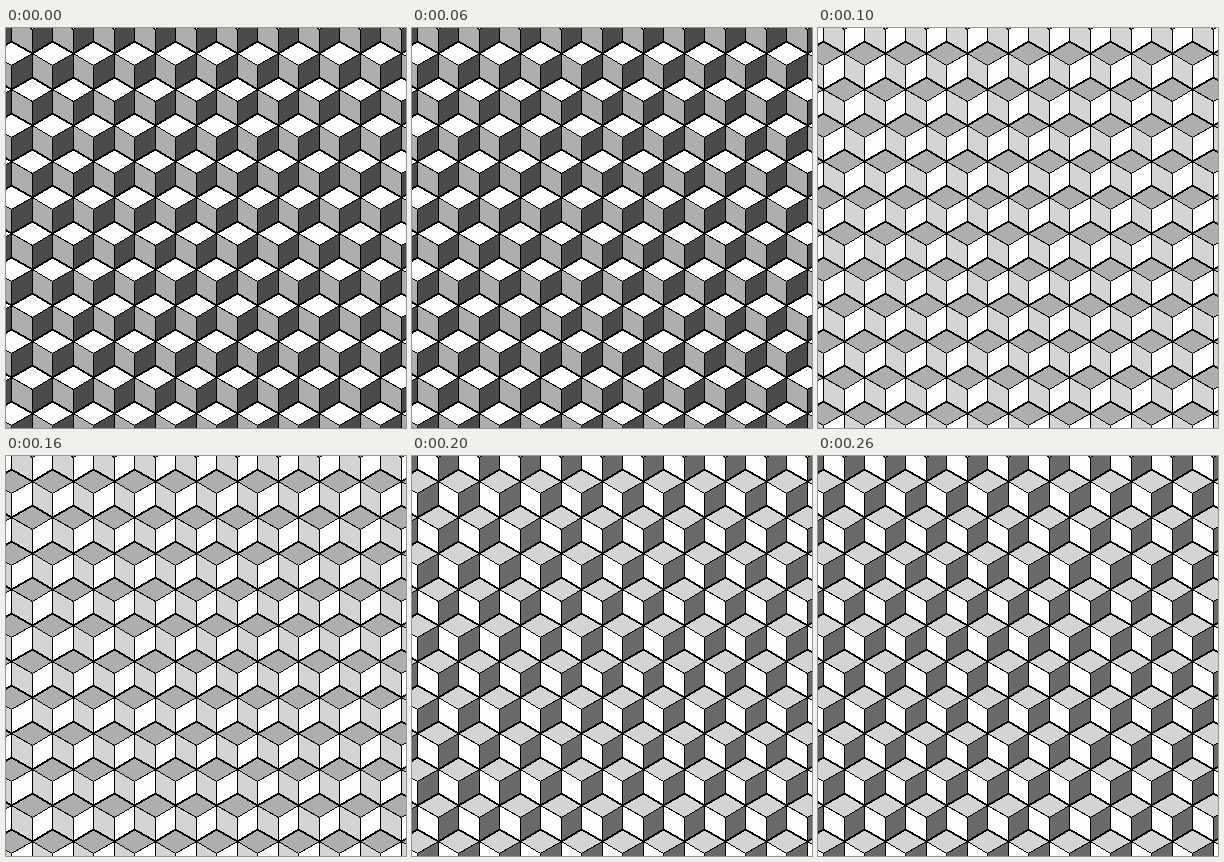
An HTML page for the animation above (0.3 s loop, 400 px wide and 400 px high).

```html
<!DOCTYPE html>
<html>
<head>
<meta charset="utf-8">
<title>Cubes</title>
<style>
html, body { margin: 0; width: 100%; height: 100%; overflow: hidden; background: #fff; }
svg { display: block; shape-rendering: crispEdges; }
path { stroke: #000; stroke-width: 1; }
.edge { fill: none; stroke-width: 1.8; }
.top { fill: var(--top); }
.left { fill: var(--left); }
.right { fill: var(--right); }
</style>
</head>
<body>
<svg id="stage" width="400" height="400" viewBox="0 0 400 400"></svg>
<script>
const stage = document.getElementById('stage');
const STEP_MS = 100;
const PITCH = 41, HALF = PITCH / 2, RISE = 12, ROW = 36;
const SHADES = [
  { top: '#fdfdfd', left: '#aeaeae', right: '#4b4b4b' },
  { top: '#aeaeae', left: '#d4d4d4', right: '#fdfdfd' },
  { top: '#d4d4d4', left: '#fdfdfd', right: '#6a6a6a' }
];

// Puts vertices on pixel centres so that upright lines stay one pixel wide
const snap = v => Math.floor(v) + 0.5;

function path(name, points, end = 'Z') {
  return `<path class="${name}" d="M${points.join('L')}${end}"/>`;
}

function cube(x, y) {
  const at = (side, level) => [snap(x + side * HALF), snap(y + level * RISE)];
  const peak = at(0, 0), mid = at(0, 2), foot = at(0, 4);
  const lt = at(-1, 1), lb = at(-1, 3), rt = at(1, 1), rb = at(1, 3);
  return path('left', [lt, mid, foot, lb]) +
    path('right', [rt, mid, foot, rb]) +
    path('top', [peak, rt, mid, lt]) +
    path('edge', [lt, peak, rt], '') +
    path('edge', [lb, foot, rb], '');
}

let cubes = '';
for (let row = -1; row < 11; row++) {
  const start = 46.5 - (row % 2 ? HALF : 0);
  for (let col = -2; col < 10; col++) {
    cubes += cube(start + col * PITCH, 13 + row * ROW);
  }
}
stage.innerHTML = cubes;

let shown = -1;
function tick() {
  const step = Math.floor(performance.now() / STEP_MS) % SHADES.length;
  if (step !== shown) {
    shown = step;
    for (const [face, color] of Object.entries(SHADES[step])) {
      stage.style.setProperty('--' + face, color);
    }
  }
  requestAnimationFrame(tick);
}
tick();
</script>
</body>
</html>
```
